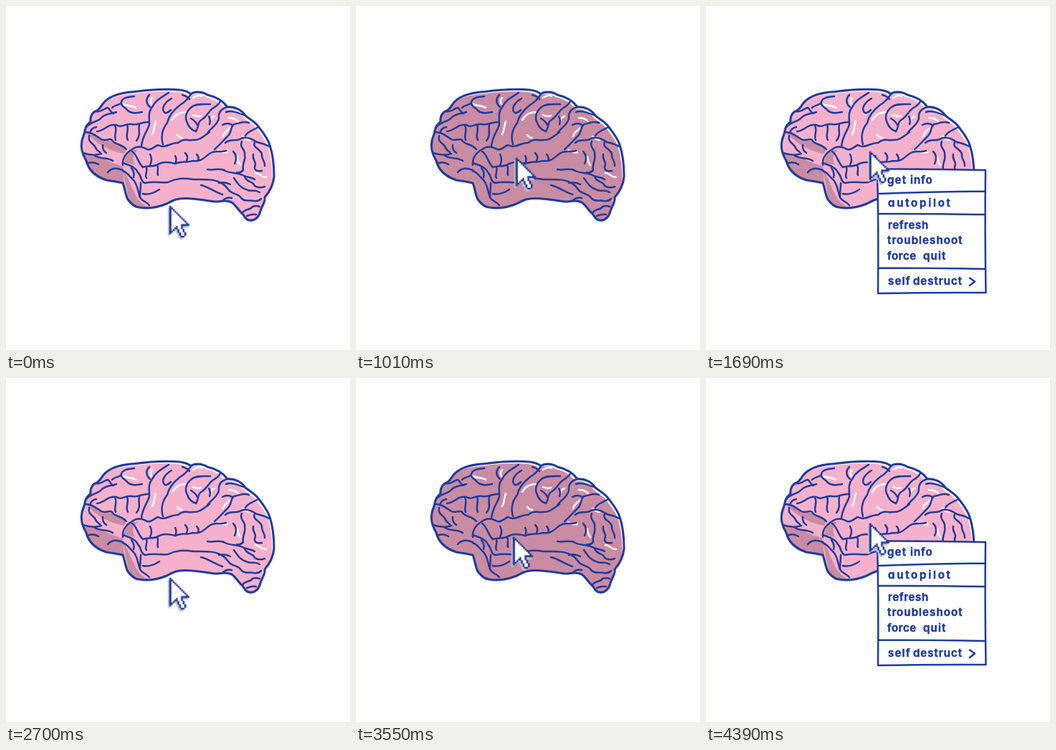
An HTML page for the animation above (4550 ms loop, 480x480 px).

```html
<!DOCTYPE html>
<html lang="en">
<head>
<meta charset="utf-8">
<title>Brain context menu</title>
<style>
  html, body { margin: 0; width: 100%; height: 100%; overflow: hidden; background: #fff; }
  svg { display: block; width: 100%; height: 100%; --ink: #203c9c; --pink: #f5b1cb; --dusk: #c98ca2; }
  .ink { fill: none; stroke: var(--ink); stroke-width: 2.5; stroke-linecap: round; stroke-linejoin: round; }
  .edge { stroke-width: 3.1; }
  .shine { fill: none; stroke: #fff; stroke-width: 2.4; stroke-linecap: round; }
  .shade { fill: var(--dusk); }
  .flesh { fill: var(--pink); animation: flash 4550ms step-end infinite; }
  .cursor { animation: move 4550ms step-end infinite; }
  .menu { animation: menu 4550ms step-end infinite; }
  text {
    font: 600 15px Inter, "Open Sans", sans-serif; font-feature-settings: "cv11";
    fill: var(--ink); stroke: var(--ink); stroke-width: .6; stroke-linejoin: round;
  }

  @keyframes flash {
    0%, 29.67%, 37.143%, 89.231%, 96.484%, 100% { fill: var(--pink); }
    3.736%, 33.407%, 63.077%, 92.967% { fill: var(--dusk); }
    59.341% { fill: var(--pink); }
  }
  @keyframes move {
    0%, 59.341% { transform: translate(228px, 279px); }
    3.736%, 63.077% { transform: translate(223px, 266px); }
    7.473%, 66.813% { transform: translate(219px, 256px); }
    11.209%, 70.549% { transform: translate(215px, 243px); }
    14.945%, 74.286% { transform: translate(210px, 230px); }
    18.681%, 78.022% { transform: translate(219px, 222px); }
    22.198%, 81.758% { transform: translate(223px, 212px); }
    25.934%, 85.495%, 100% { transform: translate(228px, 203px); }
  }
  @keyframes menu {
    0%, 59.341% { visibility: hidden; }
    29.67%, 89.231%, 100% { visibility: visible; }
  }
</style>
</head>
<body>
<svg viewBox="0 0 480 480">
  <defs>
    <path id="brain" d="M134 138C141 127 156 121 180 119.5C204 116.5 226 115.5 242 117C250 118 255 120 258 123
      C262 119 274 119 281 124C290 126 302 131 309 141C319 140 329 145 334 153C340 158 348 162 352 168
      C358 176 365 184 368 194C372 206 374 222 374 238C373 248 369 258 361 267C362 274 357 279 355 286
      C353 294 348 300 340 299C334 299 333 293 330 290C324 285 321 278 315 274C307 270 300 273 292 273
      C280 272 264 268 250 268.5C238 268 232 272 224 276C212 281 198 283 186 281C179 281 174 275 170 270
      C166 262 166 254 163 247C154 245 148 244 140 243C128 239 116 232 112 216C106 206 104 196 106 188
      C107 182 110 178 110 174C111 168 114 165 118 161C117 153 122 147 127 146C131 143 132 141 134 138Z"/>
    <clipPath id="inside"><use href="#brain"/></clipPath>
    <path id="arrow" d="M0 0h1v1h1v1h1v1h1v1h1v1h1v1h1v1h1v1h1v1h1v1h1v1h1v1H8V14H9V16H10V18H9V19H7V18H6V16H5V14H3V15H2V16H1V17H0Z"/>
  </defs>

  <g clip-path="url(#inside)">
    <use href="#brain" class="flesh" transform="translate(-2.5 3)"/>
    <path class="shade" d="M106 205C118 209 128 208 136 213C146 219 156 221 163 224L165 248L130 244L108 222Z"/>
    <path class="shade" d="M110 176C118 176 126 181 133 186C144 186 154 192 168 200L165 206C150 204 134 196 124 188Z"/>
    <path class="shade" d="M168 207C172 202 178 200 184 201C176 206 176 214 180 222L165 218Z"/>
    <path class="shade" d="M163 228C170 236 173 250 179 260C184 272 190 276 198 281L186 284L172 274Z"/>
  </g>

  <g class="shine">
    <path d="M162 136C167 140 175 138 181 142"/>
    <path d="M204 128Q200 132 203 137"/>
    <path d="M232 159C236 152 243 148 251 148"/>
    <path d="M204 179C208 173 206 168 209 161"/>
    <path d="M239 180Q242 184 246 184"/>
    <path d="M261 152C265 154 268 155 272 153"/>
    <path d="M261 128Q268 123 273 126"/>
    <path d="M285 161Q286 155 291 154"/>
    <path d="M311 156Q319 156 324 161"/>
    <path d="M303 182C304 176 309 174 313 170"/>
    <path d="M330 182Q335 187 340 187"/>
    <path d="M296 201Q303 205 309 204"/>
    <path d="M323 210Q323 217 327 222"/>
    <path d="M348 233C354 233 357 240 363 239"/>
  </g>

  <g class="ink">
    <use href="#brain" class="edge"/>
    <!-- frontal lobe -->
    <path d="M110 176C118 175 125 181 133 186C139 189 144 184 148 187C151 194 160 191 168 200"/>
    <path d="M112 169C119 161 128 162 133 156C139 149 147 151 154 148"/>
    <path d="M126 147C132 149 138 142 142 142C145 143 145 148 150 150"/>
    <path d="M179 126C170 127 162 128 161 134C160 139 152 137 148 142"/>
    <path d="M161 134C160 140 166 141 170 146C176 151 184 149 190 148"/>
    <path d="M200 124C194 130 196 137 201 141"/>
    <path d="M117 177Q119 170 126 169"/>
    <path d="M127 175C138 174 142 164 154 166C162 171 166 163 176 165C184 167 190 161 199 162"/>
    <path d="M152 167C156 174 150 180 153 187M169 166C172 174 166 180 170 187M186 165C184 174 189 179 182 188"/>
    <path d="M116 181C114 190 121 191 124 196Q126 201 131 204"/>
    <path d="M107 205C117 208 125 209 133 206M124 209C133 214 142 211 149 216"/>
    <path d="M135 194Q134 201 140 205M113 220Q121 216 129 221"/>
    <path d="M142 232C148 225 155 226 163 229"/>
    <!-- central folds -->
    <path d="M227 121C216 128 208 132 204 141C198 148 200 155 200 165C198 174 190 181 189 196"/>
    <path d="M231 129C222 134 217 142 220 147C222 151 226 149 230 145"/>
    <path d="M258 123C253 130 250 134 243 138C234 145 227 153 225 163C218 172 216 183 219 193"/>
    <path d="M246 124Q253 126 256 130"/>
    <path d="M285 137C276 137 265 136 259 141C251 147 249 156 253 163C256 172 262 174 265 175"/>
    <path d="M265 175C270 168 266 162 274 158C281 153 281 149 288 143C293 140 297 138 299 133"/>
    <path d="M258 157Q264 160 267 166"/>
    <path d="M309 141C301 143 296 148 297 157C294 168 285 170 281 178"/>
    <path d="M283 154Q286 159 284 165"/>
    <path d="M334 153C326 150 315 145 307 148"/>
    <path d="M339 163C331 160 326 164 318 165C312 170 316 176 309 182C302 189 298 194 291 200"/>
    <path d="M302 166Q309 162 316 166"/>
    <!-- temporal lobe -->
    <path d="M163 222C162 211 169 204 176 200C182 195 190 196 197 200C202 202 207 196 212 194C222 200 230 190 240 191C248 184 254 188 260 187C270 188 277 181 284 176"/>
    <path d="M176 203C183 207 184 219 191 225C198 222 202 225 210 222C220 216 228 218 236 220C246 216 254 219 260 216C272 218 277 211 284 206C292 200 300 205 307 202"/>
    <path d="M201 207Q205 214 201 222M236 209Q239 214 236 220M250 205Q255 210 252 216M266 207Q270 211 268 216"/>
    <path d="M196 225C198 231 193 236 196 240M211 222C214 228 210 231 212 236"/>
    <path d="M163 219C171 222 180 224 184 232C190 238 187 245 194 247C206 244 216 247 226 246C238 240 248 240 262 242C278 242 292 241 302 248"/>
    <path d="M163 230C171 233 173 239 178 243C184 250 184 259 187 267C190 273 195 272 200 278"/>
    <path d="M175 226Q180 233 178 239M188 247C188 254 187 260 187 267"/>
    <path d="M191 262C200 264 208 260 214 256M272 250C282 252 290 259 302 263"/>
    <!-- back folds -->
    <path d="M306 191C312 185 319 189 326 186C334 181 344 186 350 190C357 192 361 192 367 196"/>
    <path d="M352 169C344 174 338 174 334 181"/>
    <path d="M329 189C325 198 335 200 333 208C335 215 329 220 331 229"/>
    <path d="M347 190C343 198 356 199 357 207C356 214 362 216 361 223"/>
    <path d="M345 207C343 216 351 217 347 224C346 230 352 231 357 230"/>
    <path d="M317 203Q324 210 319 220"/>
    <path d="M281 228C290 230 298 225 306 230C314 234 322 232 330 236C337 240 342 238 347 242"/>
    <path d="M331 229Q326 234 322 232M297 247Q306 245 313 249"/>
    <path d="M333 238C336 247 345 244 347 251Q353 255 361 252"/>
    <path d="M302 248C309 251 308 257 315 260C322 264 325 262 329 269C335 274 341 270 346 272Q352 273 356 269"/>
    <path d="M318 240C323 247 326 253 335 256C341 260 346 255 354 260"/>
    <path d="M303 271Q308 266 315 268"/>
    <path d="M330 289C333 282 340 286 344 280Q349 278 354 280M336 293Q343 290 349 291"/>
  </g>

  <g class="menu">
    <path class="ink" style="fill:#fff" d="M239 227.5Q310 227 390 229Q389 310 390.5 400Q310 399.5 240 401Q241 310 239 227.5Z
      M240 262Q310 259 389 258.5M240 290Q310 289.5 389 291M240 365.5Q310 365.5 390 367M368 379.5L375 384.5L368 390"/>
    <g>
      <text x="253" y="248" letter-spacing="1.2">get</text>
      <text x="285" y="248" letter-spacing="1">info</text>
      <text x="254" y="280" letter-spacing="2.8">autopilot</text>
      <text x="254" y="311" letter-spacing=".65">refresh</text>
      <text x="253" y="332" letter-spacing="1.1">troubleshoot</text>
      <text x="253" y="354" letter-spacing=".6">force</text>
      <text x="303" y="354" letter-spacing="1.2">quit</text>
      <text x="254" y="388.5" letter-spacing="1.2">self</text>
      <text x="289" y="388.5" letter-spacing="1">destruct</text>
    </g>
  </g>

  <g class="cursor">
    <g transform="scale(2.3)">
      <use href="#arrow" fill="#c6c6cb" x="-.9" y="1.3"/>
      <use href="#arrow" fill="#203c9c" stroke="#203c9c" stroke-width=".3"/>
      <path fill="#fff" d="M1.2 2h.8v1h1v1h1v1h1v1h1v1h1v1h1v1h1v1h1v1H7V14H8V16H9V18H7V16H6V14H5V12H4V13H3V14H2V15H1.2Z"/>
    </g>
  </g>
</svg>
</body>
</html>
```
